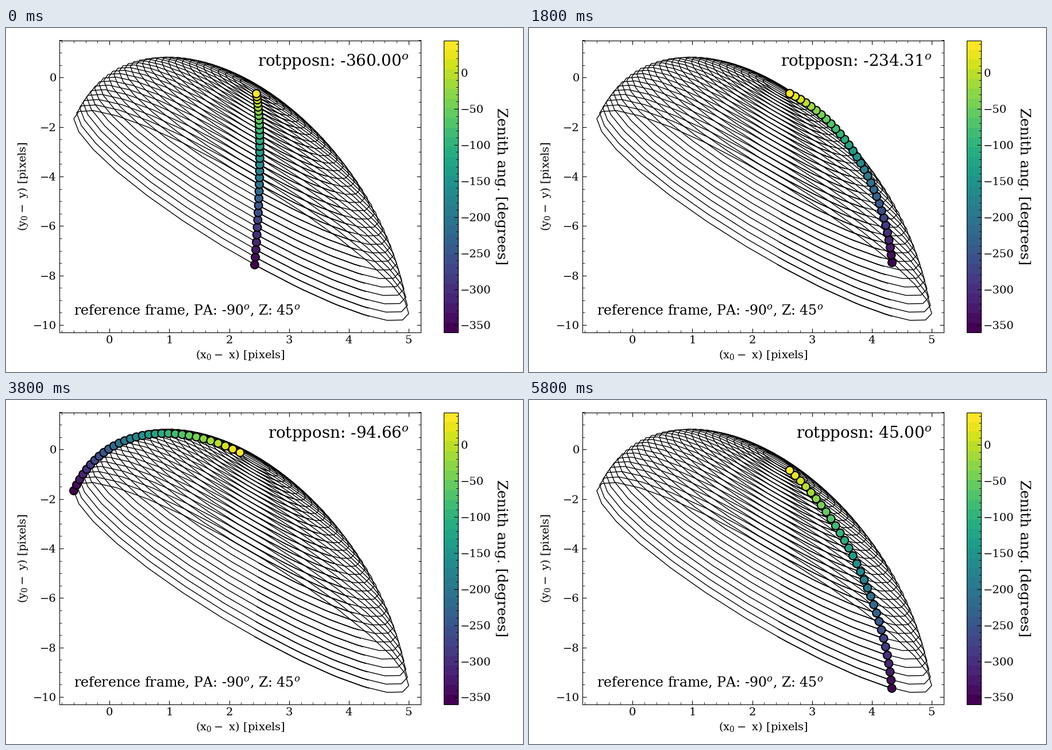
A matplotlib script that plays this animation: 900x600 px, repeating every 6 s.

```python
import matplotlib.pyplot as plt
import numpy as np
from matplotlib.animation import FuncAnimation
from matplotlib.cm import ScalarMappable
from matplotlib.colors import Normalize
from matplotlib.ticker import AutoMinorLocator, MultipleLocator

W, H, N = 900, 600, 30

plt.rcParams.update({
    "font.family": "DejaVu Serif",
    "mathtext.fontset": "dejavuserif",
    "font.size": 14,
    "xtick.direction": "in", "ytick.direction": "in",
    "xtick.top": True, "ytick.right": True,
    "xtick.major.size": 5, "ytick.major.size": 5,
    "xtick.minor.size": 3, "ytick.minor.size": 3,
})

rot = np.linspace(-360, 45, N)
zen = np.radians(np.linspace(75, 5, N))


def offsets(angle):
    """Pixel offsets of every zenith step at one rotator angle."""
    c, s = np.cos(np.radians(angle)), np.sin(np.radians(angle))
    x = 2.120 + 0.315 * np.cos(zen) + (0.2326 * c + 2.889 * s) * np.sin(zen)
    y = -7.370 + 6.920 * np.cos(zen) - (2.058 * c + 3.897 * s) * np.sin(zen)
    return np.column_stack([x, y])


def rect(x0, y0, x1, y1):
    return [x0 / W, 1 - y1 / H, (x1 - x0) / W, (y1 - y0) / H]


fig = plt.figure(figsize=(W / 100, H / 100), dpi=100, facecolor="white")
ax = fig.add_axes(rect(92.5, 21.5, 722.5, 531))
ax.set(xlim=(-0.843, 5.206), ylim=(-10.3, 1.5),
       xlabel=r"(x$_0-$ x) [pixels]", ylabel=r"(y$_0-$ y) [pixels]")
ax.xaxis.set_major_locator(MultipleLocator(1))
ax.yaxis.set_major_locator(MultipleLocator(2))
ax.xaxis.set_minor_locator(AutoMinorLocator(5))
ax.yaxis.set_minor_locator(AutoMinorLocator(4))

tracks = np.array([offsets(a) for a in rot])
ax.plot(tracks[:, :, 0], tracks[:, :, 1], color="black", lw=1, zorder=1)

cmap = plt.get_cmap("viridis", N)
norm = Normalize(-360, 45)
dots = ax.scatter(*tracks[0].T, c=rot, cmap=cmap, norm=norm, s=100,
                  edgecolors="black", linewidths=1.5, zorder=3)

cax = fig.add_axes(rect(761.5, 21.5, 786.5, 531))
bar = fig.colorbar(ScalarMappable(norm, cmap), cax=cax)
bar.set_ticks(MultipleLocator(50))
cax.yaxis.set_minor_locator(AutoMinorLocator(5))
bar.set_label("Zenith ang. [degrees]", size=18, rotation=270, labelpad=20)

ax.text(-0.6, -9.58, "reference frame, PA: -90$^o$, Z: 45$^o$", size=17)
title = ax.text(5, 0.47, "", size=20, ha="right", zorder=4)


def update(i):
    dots.set_offsets(tracks[i])
    title.set_text(f"rotpposn: {rot[i]:.2f}$^o$")
    return dots, title


anim = FuncAnimation(fig, update, frames=N, interval=200, repeat=True,
                     repeat_delay=0)
plt.show()
```
